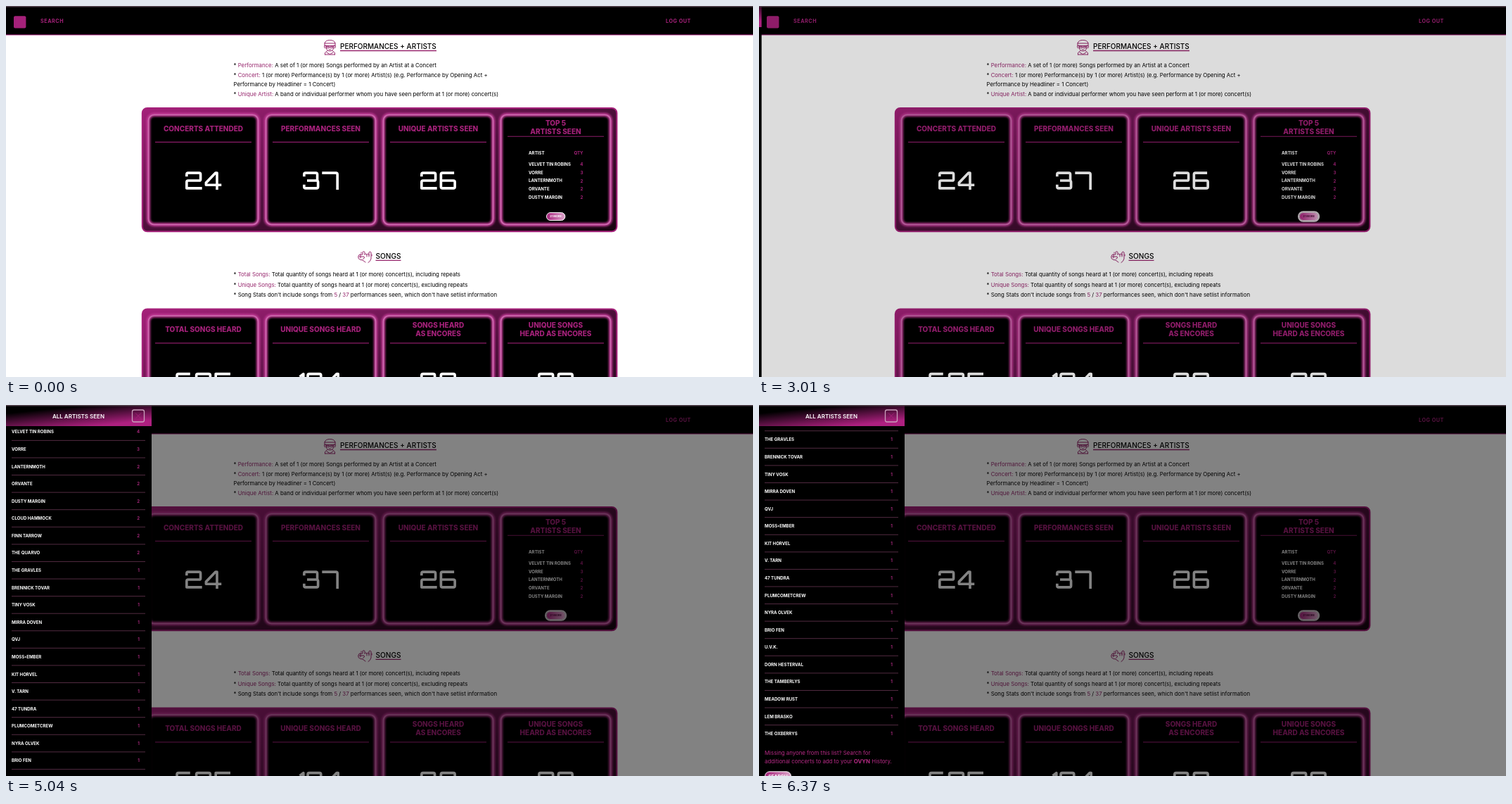
Write an HTML page that moves like this. It is 1062x527 px and loops after 8000 ms.

```html
<!DOCTYPE html>
<html lang="en">
<head>
<meta charset="utf-8">
<title>Concert stats</title>
<style>
  html, body { margin: 0; width: 100%; height: 100%; overflow: hidden; background: #fff; }
  svg { display: block; width: 100%; height: 100%; font-family: Inter, Roboto, sans-serif; }
</style>
</head>
<body>
<svg id="stage" viewBox="0 0 1062 527" xmlns="http://www.w3.org/2000/svg"></svg>
<script>
const LOOP = 8000, STEP = 70;
const PINK = '#a5217a', LABEL = '#97266d';
const ROW = 24.58, DRAWER = 207;

const artists = [
  'VELVET TIN ROBINS', 'VORRE', 'LANTERNMOTH', 'ORVANTE', 'DUSTY MARGIN', 'CLOUD HAMMOCK',
  'FINN TARROW', 'THE QUARVO', 'THE GRAVLES', 'BRENNICK TOVAR', 'TINY VOSK', 'MIRRA DOVEN',
  'QVJ', 'MOSS•EMBER', 'KIT HORVEL', 'V. TARN', '47 TUNDRA', 'PLUMCOMETCREW', 'NYRA OLVEK',
  'BRIO FEN', 'U.V.K.', 'DORN HESTERVAL', 'THE TAMBERLYS', 'MEADOW RUST', 'LEM BRASKO', 'THE OXBERRYS'
];
const quantity = i => i === 0 ? 4 : i === 1 ? 3 : i < 8 ? 2 : 1;

// y is the vertical centre of the capitals
const text = (x, y, s, size, fill, weight = 400, anchor = 'start', more = '') =>
  `<text x="${x}" y="${(y + size * 0.364).toFixed(2)}" font-size="${size}" fill="${fill}" font-weight="${weight}" text-anchor="${anchor}" ${more}>${s}</text>`;
const rect = (x, y, w, h, r, more) =>
  `<rect x="${x}" y="${y}" width="${w}" height="${h}" rx="${r}" ${more}/>`;
const line = (x1, x2, y, color, w = 1) =>
  `<path d="M${x1} ${y}H${x2}" stroke="${color}" stroke-width="${w}"/>`;
const mark = s => `<tspan fill="${LABEL}">${s}</tspan>`;
const body = (y, s) => text(323.5, y, s, 7.85, '#000');

// Square display digits on a 23 x 25 cell
const digits = {
  1: 'M1 6L6 2V25',
  2: 'M2 7V4Q2 2 4 2H19Q21 2 21 4V10.5Q21 12.5 19 12.5H4Q2 12.5 2 14.5V23H23',
  3: 'M2 7V4Q2 2 4 2H18Q20 2 20 4V12.5M6 12.5H19Q21 12.5 21 14.5V21Q21 23 19 23H4Q2 23 2 21V18',
  4: 'M17 25V2H15L2 15.5V18.5H23',
  5: 'M22 2H2V12.5H19Q21 12.5 21 14.5V21Q21 23 19 23H4Q2 23 2 21V18',
  6: 'M20 2H4Q2 2 2 4V21Q2 23 4 23H19Q21 23 21 21V14.5Q21 12.5 19 12.5H2',
  7: 'M0 2H19Q21 2 21 4V25',
  9: 'M21 12.5H4Q2 12.5 2 10.5V4Q2 2 4 2H19Q21 2 21 4V21Q21 23 19 23H4',
  0: 'M4 2H19Q21 2 21 4V21Q21 23 19 23H4Q2 23 2 21V4Q2 2 4 2Z'
};

function number(cx, cy, value) {
  let x = 0, out = '';
  for (const d of value) {
    out += `<path d="${digits[d]}" transform="translate(${x} 0)"/>`;
    x += d === '1' ? 10 : 26.5;
  }
  return `<g transform="translate(${cx} ${cy}) scale(1.04) translate(${(3.5 - x) / 2} -12.5)" fill="none" stroke="#fff" stroke-width="3.5" stroke-linejoin="round">${out}</g>`;
}

function card(x, y, title, ruleY, titleY) {
  const cx = x + 78.5;
  const box = more => rect(x + 0.5, y + 0.5, 156, 156, 8, more);
  const first = titleY - (title.length - 1) * 6.2;
  return box('fill="#000"')
    + box('fill="none" stroke="#c53b98" stroke-width="5" filter="url(#glow)"')
    + box('fill="none" stroke="#cb6cae" stroke-width="1.7"')
    + title.map((s, i) => text(cx, first + i * 12.4, s, 10, PINK, 800, 'middle')).join('')
    + line(x + 10, x + 147, ruleY, '#8b1c68', 1.1);
}

const panel = y =>
  rect(193.8, y + 0.9, 674.6, 175.4, 7, `fill="url(#panel)" stroke="${PINK}" stroke-width="2"`);
const cardX = i => 202 + i * 167;

function statCards(y, stats) {
  return stats.map(([title, value], i) =>
    card(cardX(i), y + 10, title, y + 49.4, y + 30.1) + number(cardX(i) + 78.5, y + 104, value)).join('');
}

function topFive() {
  let out = card(cardX(3), 154, ['TOP 5', 'ARTISTS SEEN'], 185.3, 172.6)
    + text(743, 208.5, 'ARTIST', 6.2, '#fff', 700) + text(820.5, 208.5, 'QTY', 6.1, PINK, 700, 'end');
  for (let i = 0; i < 5; i++) {
    const y = 225 + i * 11.63;
    out += text(743, y, artists[i], 6.1, '#fff', 700) + text(820.5, y, quantity(i), 6.2, PINK, 700, 'end');
  }
  return out
    + rect(766, 296, 31, 11.5, 6, 'id="shade" fill="#d9a9c8" filter="url(#soft)"')
    + rect(767, 292.2, 29.2, 13.6, 6.8, 'id="ring" fill="none" stroke="#cfc6cc" stroke-width="2"')
    + rect(768.5, 293.5, 26.4, 11, 5.5, 'fill="url(#pill)"')
    + rect(768.5, 293.5, 26.4, 11, 5.5, 'id="edge" fill="none" stroke="#fff" stroke-width="1"')
    + text(781.6, 299, '21 MORE', 3.9, '#fff', 700, 'middle', 'id="more"');
}

const icons = `<g fill="none" stroke="${LABEL}" stroke-width="1" stroke-linecap="round" stroke-linejoin="round">
  <path d="M453 56V53Q454 48.5 460.5 48.5T468 53V56ZM453 53H468M455 56V59Q456 64 460.5 64T466 59V56"/>
  <path d="M456 57.5H459.5V59.5H456ZM461.5 57.5H465V59.5H461.5ZM459 62H462M453 56Q451.5 58 453.5 60M468 56Q469.5 58 467.5 60"/>
  <path d="M453.5 69V66.5L457 63.5M467.5 69V66.5L464 63.5M453.5 69H467.5M456 66L460.5 68.5L465 66"/>
  <path d="M511 364L507 361Q503 361 501 358.5Q500 355 502.5 353H507V349.5Q508.5 347.8 510 349.5V353"/>
  <path d="M510 353Q511.5 350.8 513 353V356M513 353Q514.5 351 516 353V356M516 354V350Q517.5 348 519 350V359Q518 363 515 364.5M502 356H509Q511 358 507.5 359.5M504 353V358M520 353V355M505 350V351"/>
</g>`;

function page() {
  return rect(0, 0, 1062, 527, 0, 'fill="#fff"')
    + rect(0, 0, 1062, 41, 0, 'fill="#000"') + line(0, 1062, 41, PINK)
    + rect(11, 14.2, 17.4, 17.4, 2, `fill="${PINK}"`)
    + text(49, 21.5, 'SEARCH', 7.2, PINK, 700, 'start', 'letter-spacing=".55"')
    + text(938, 21.5, 'LOG OUT', 7.2, PINK, 700, 'start', 'letter-spacing=".55"')
    + icons
    + text(475, 57.2, 'PERFORMANCES + ARTISTS', 10, '#000', 500) + line(475, 612, 63.5, LABEL, 1.3)
    + body(84, `* ${mark('Performance:')} A set of 1 (or more) Songs performed by an Artist at a Concert`)
    + body(98.4, `* ${mark('Concert:')} 1 (or more) Performance(s) by 1 (or more) Artist(s) (e.g. Performance by Opening Act +`)
    + body(110.8, 'Performance by Headliner = 1 Concert)')
    + body(125.3, `* ${mark('Unique Artist:')} A band or individual performer whom you have seen perform at 1 (or more) concert(s)`)
    + panel(144)
    + statCards(144, [[['CONCERTS ATTENDED'], '24'], [['PERFORMANCES SEEN'], '37'], [['UNIQUE ARTISTS SEEN'], '26']])
    + topFive()
    + text(525.5, 355, 'SONGS', 10.1, '#000', 500) + line(525.5, 561.5, 361.3, LABEL, 1.3)
    + body(381.4, `* ${mark('Total Songs:')} Total quantity of songs heard at 1 (or more) concert(s), including repeats`)
    + body(396, `* ${mark('Unique Songs:')} Total quantity of songs heard at 1 (or more) concert(s), excluding repeats`)
    + body(410.6, `* Song Stats don't include songs from ${mark('5')} / ${mark('37')} performances seen, which don't have setlist information`)
    + panel(429.5)
    + statCards(429.5, [[['TOTAL SONGS HEARD'], '605'], [['UNIQUE SONGS HEARD'], '134'],
      [['SONGS HEARD', 'AS ENCORES'], '30'], [['UNIQUE SONGS', 'HEARD AS ENCORES'], '29']]);
}

function list() {
  const top = 68.7, end = top + 25 * ROW;
  let out = text(8, 43.3, 'ARTIST', 6.2, '#fff', 700) + text(198, 43.3, 'QTY', 6.1, '#b02a83', 700, 'end');
  artists.forEach((name, i) => {
    const y = top + i * ROW;
    out += line(8, 198, y - 12.4, '#5c3049', 0.9)
      + text(8, y, name, 6.1, '#fff', 700) + text(190, y, quantity(i), 6.1, '#a5277a', 700, 'end');
  });
  return out
    + text(8, end + 26.8, 'Missing anyone from this list? Search for', 7.85, '#b62a85')
    + text(8, end + 39.2, 'additional concerts to add to your <tspan font-weight="700">OVYN</tspan> History.', 7.85, '#b62a85')
    + rect(8.5, end + 53.8, 37, 13, 6.5, 'fill="url(#pill)" stroke="#fff" stroke-width="1"')
    + text(27, end + 60.3, 'SEARCH', 6.6, '#fff', 700, 'middle');
}

const stage = document.getElementById('stage');
stage.innerHTML = `<defs>
  <linearGradient id="panel" x1="0" y1="0" x2="1" y2="1">
    <stop offset="0" stop-color="#a5217a"/><stop offset=".5" stop-color="#4d0f3a"/><stop offset="1" stop-color="#16040f"/>
  </linearGradient>
  <linearGradient id="pill"><stop offset="0" stop-color="#a5217a"/><stop offset="1" stop-color="#dca6cb"/></linearGradient>
  <linearGradient id="head" gradientUnits="userSpaceOnUse" x1="100" y1="2" x2="103" y2="32">
    <stop offset="0" stop-color="#000"/><stop offset="1" stop-color="#ae2080"/>
  </linearGradient>
  <filter id="glow" x="-10%" y="-10%" width="120%" height="120%"><feGaussianBlur stdDeviation="1.7"/></filter>
  <filter id="soft" x="-30%" y="-60%" width="160%" height="220%"><feGaussianBlur stdDeviation="1.6"/></filter>
</defs>
${page()}
${rect(0, 0, 1062, 527, 0, 'id="veil" fill="#000"')}
<g id="drawer">
  ${rect(0, 0, DRAWER, 527, 0, 'fill="#000"')}
  <g id="list">${list()}</g>
  ${rect(0, 0, DRAWER, 30, 0, 'fill="url(#head)"')}
  ${text(103, 15.7, 'ALL ARTISTS SEEN', 8, '#fff', 600, 'middle')}
  ${rect(179.5, 7, 17, 17, 2.5, 'fill="none" stroke="#c9a0bb" stroke-width="1.3"')}
  <path d="M184 11.5L192 19.5M192 11.5L184 19.5" stroke="${PINK}" stroke-width="1"/>
</g>
${rect(0, 0, 1062, 1.5, 0, 'fill="#55454f"')}`;

const part = {};
for (const id of ['shade', 'ring', 'edge', 'more', 'veil', 'drawer', 'list'])
  part[id] = document.getElementById(id);
const set = (id, name, value) => part[id].setAttribute(name, value);
const ramp = (t, a, b) => Math.min(1, Math.max(0, (t - a) / (b - a)));
const smooth = u => u * u * (3 - 2 * u);

// Scroll knots: time (ms), offset (px), speed (px/ms)
const knots = [[4480, 0, 0.015], [5040, 30.5, 0.075], [5880, 106.8, 0.15], [6370, 216.2, 0.11]];
function scrollAt(t) {
  if (t <= knots[0][0]) return 0;
  for (let i = 1; i < knots.length; i++) {
    const [a, p, m] = knots[i - 1], [b, q, n] = knots[i];
    if (t > b) continue;
    const d = b - a, u = (t - a) / d, v = 1 - u;
    return v * v * (1 + 2 * u) * p + u * u * (3 - 2 * u) * q + d * u * v * (v * m - u * n);
  }
  return knots[knots.length - 1][1];
}

function draw(t) {
  const hover = ramp(t, 1960, 2100), press = ramp(t, 2660, 2870), open = ramp(t, 2980, 3360);
  set('shade', 'opacity', hover * (1 - press) * 0.75);
  set('edge', 'opacity', Math.max(1 - hover, press * 0.6));
  set('ring', 'opacity', press);
  set('more', 'fill', press > 0.5 ? '#4a0d38' : '#fff');
  set('veil', 'opacity', 0.49 * (1 - (1 - open) ** 4));
  set('drawer', 'transform', `translate(${(smooth(open) - 1) * DRAWER} 0)`);
  set('list', 'transform', `translate(0 ${-scrollAt(t)})`);
}

let shown = -1;
const start = performance.now();
function tick(now) {
  const t = Math.floor((Math.max(0, now - start) % LOOP) / STEP) * STEP;
  if (t !== shown) draw(shown = t);
  requestAnimationFrame(tick);
}
draw(0);
requestAnimationFrame(tick);
</script>
</body>
</html>
```
